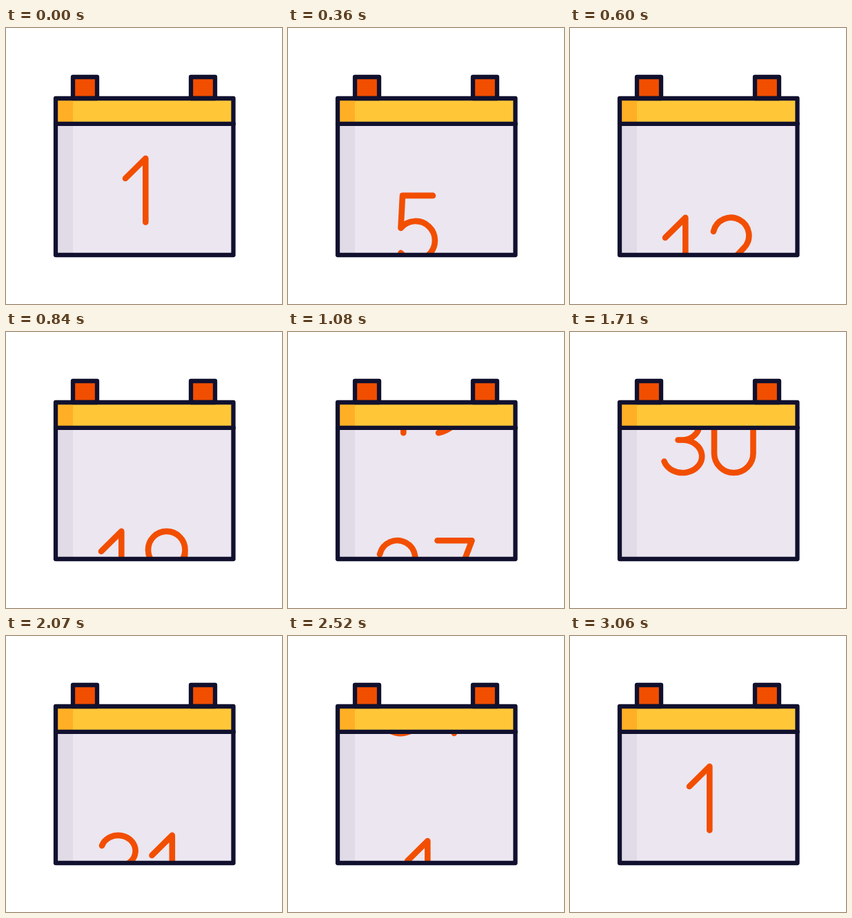
Recreate the animation shown at these times as an HTML page with a canvas. Size 400 by 400 pixels, loop 4120 ms.

```html
<!DOCTYPE html>
<html lang="en">
<head>
<meta charset="utf-8">
<title>Calendar</title>
<style>
  html, body { margin: 0; width: 100%; height: 100%; overflow: hidden; background: #fff; }
  canvas { display: block; width: 400px; height: 400px; }
</style>
</head>
<body>
<canvas id="stage"></canvas>
<script>
const LOOP = 4120, STEP = 30, SPACING = 248.5, DIGIT_TOP = 189;
const INK = '#11112f', RED = '#f24e00', YELLOW = '#ffc738', AMBER = '#ffaf25',
      PAPER = '#ebe6f0', SHADE = '#e0dbe6';

const canvas = document.getElementById('stage');
const ctx = canvas.getContext('2d');
const ratio = window.devicePixelRatio || 1;
canvas.width = canvas.height = 400 * ratio;

// Digit strokes, 92.5 high, starting at the top
const glyphs = {
  0: 'M0 28.25A28.25 28.25 0 0 1 56.5 28.25V64.25A28.25 28.25 0 0 1 0 64.25Z',
  1: 'M0 29L29.3 0V92.5',
  2: 'M2 20A26 26 0 1 1 46 44L0 92.5H55.5',
  3: 'M2.5 15A25 22.5 0 1 1 26 45H20M26 45A28 23.75 0 1 1 0 76',
  5: 'M46.5 0H2.5L0 47A28 28 0 1 1 0 83',
  6: 'M43 0C18 5 0 28 0 64.5a28 28 0 1 0 56 0a28 28 0 1 0 -56 0',
  7: 'M0 0H50L15 92.5',
  8: 'M4.5 22.5a23.5 22.5 0 1 1 47 0a23.5 22.5 0 1 1 -47 0' +
     'M0 68.75a28 23.75 0 1 1 56 0a28 23.75 0 1 1 -56 0',
  9: 'M0 26.75a26.75 26.75 0 1 1 53.5 0a26.75 26.75 0 1 1 -53.5 0' +
     'M53.5 26.75C53.5 64 36 88 12 92.5'
};
for (const d in glyphs) glyphs[d] = new Path2D(glyphs[d]);

// Each label: its digits and their left edges
const labels = [
  ['1', 173], ['5', 163.5], ['12', 138, 206], ['19', 138, 206],
  ['27', 131, 216.5], ['86', 130.5, 210], ['30', 136.5, 209],
  ['28', 131, 209], ['31', 136.5, 211.5], ['1', 173]
];

// Scroll curve: time, position in labels, speed
const keys = [
  [0, 0, 0], [360, 0.783, 0.0033], [840, 2.598, 0.0039], [1320, 4.539, 0.0043],
  [1710, 6.312, 0.0042], [2070, 7.598, 0.0027], [3060, 9, 0]
];

function scrollAt(t) {
  const i = keys.findIndex(k => k[0] > t);
  if (i < 0) return labels.length - 1;
  const [t0, s0, v0] = keys[i - 1], [t1, s1, v1] = keys[i];
  const d = t1 - t0, p = (t - t0) / d, q = 1 - p;
  return q * q * ((1 + 2 * p) * s0 + p * d * v0) +
         p * p * ((1 + 2 * q) * s1 - q * d * v1);
}

function fill(color, x, y, w, h) {
  ctx.fillStyle = color;
  ctx.fillRect(x, y, w, h);
}

function drawLabel([text, ...xs], y) {
  xs.forEach((x, i) => {
    ctx.save();
    ctx.translate(x, y);
    ctx.stroke(glyphs[text[i]]);
    ctx.restore();
  });
}

function drawDigits(scroll) {
  ctx.save();
  ctx.beginPath();
  ctx.rect(72, 139, 258, 190);
  ctx.clip();
  ctx.strokeStyle = RED;
  ctx.lineWidth = 8.6;
  labels.forEach((label, i) => {
    const offset = (i - scroll) * SPACING;
    if (Math.abs(offset) < 200) drawLabel(label, DIGIT_TOP + offset);
  });
  ctx.restore();
}

function draw(t) {
  ctx.setTransform(ratio, 0, 0, ratio, 0, 0);
  ctx.lineCap = ctx.lineJoin = 'round';
  fill('#fff', 0, 0, 400, 400);
  fill(PAPER, 72, 139, 257.5, 190);
  fill(SHADE, 72, 139, 25, 190);
  drawDigits(scrollAt(t));
  fill(YELLOW, 72, 102, 257.5, 37);
  fill(AMBER, 72, 102, 25, 37);

  ctx.strokeStyle = INK;
  ctx.lineWidth = 6.3;
  for (const x of [97, 268]) {
    fill(RED, x, 71, 35, 31);
    ctx.strokeRect(x, 71, 35, 31);
  }
  ctx.strokeRect(72, 102, 257.5, 227);
  ctx.beginPath();
  ctx.moveTo(72, 138.8);
  ctx.lineTo(329.8, 138.8);
  ctx.stroke();
}

const start = performance.now();
function tick() {
  const t = (performance.now() - start) % LOOP;
  draw(Math.floor(t / STEP) * STEP);
  requestAnimationFrame(tick);
}
tick();
</script>
</body>
</html>
```
